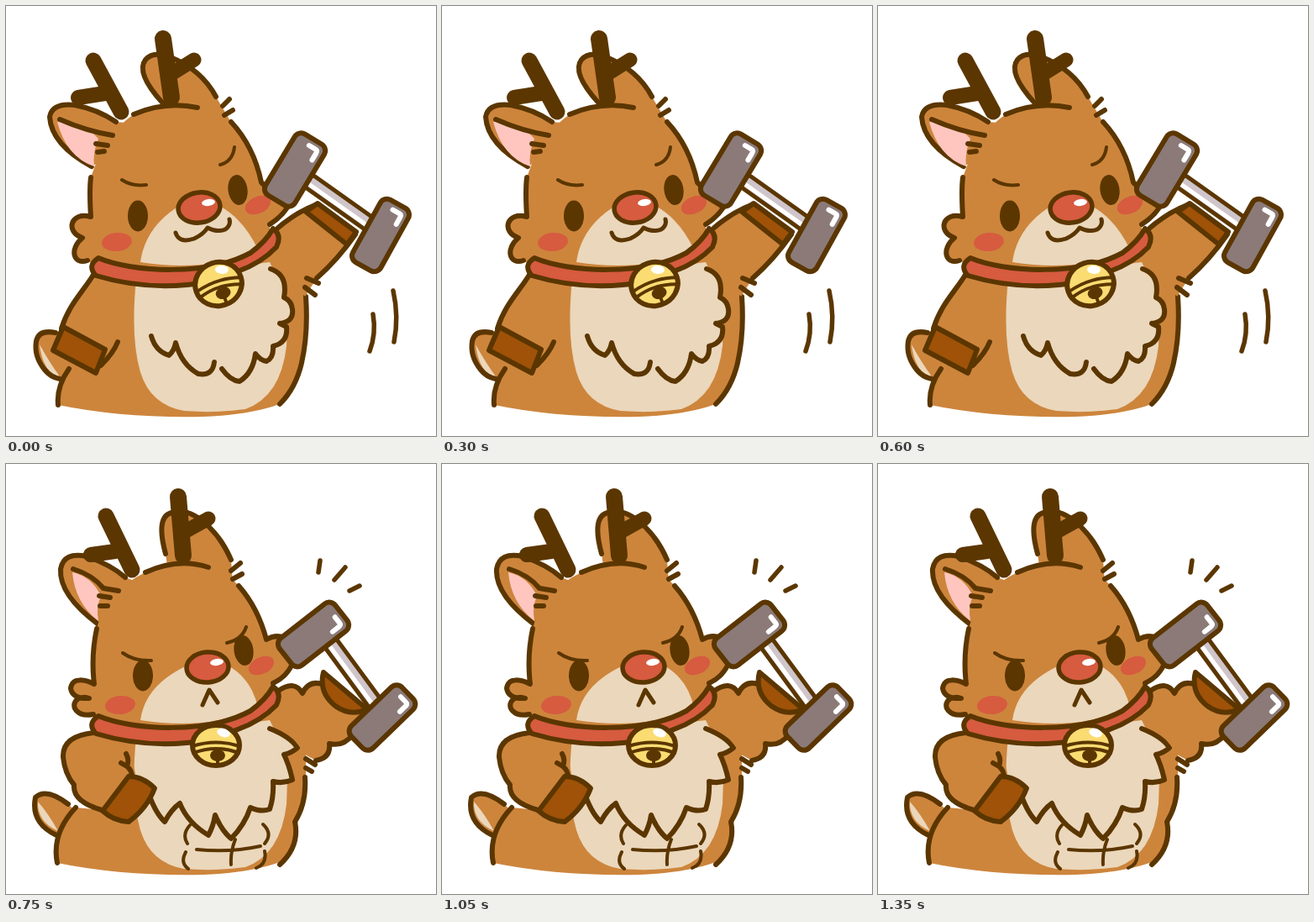
Write an HTML page that moves like this. It is 512x512 px and loops after 1.5 s.

```html
<!DOCTYPE html>
<html lang="en">
<head>
<meta charset="utf-8">
<title>Reindeer workout</title>
<style>
  html, body { margin: 0; width: 100%; height: 100%; overflow: hidden; background: #fff; }
  svg { display: block; width: 100vw; height: 100vh; }
</style>
</head>
<body>
<svg id="stage" viewBox="0 0 512 512" stroke-linecap="round" stroke-linejoin="round"></svg>
<script>
const INK = '#5b3600', FUR = '#cd853c', CREAM = '#ebd7bb', CUFF = '#9f5208', RED = '#d65b3f',
  PINK = '#fec6bf', GOLD = '#fbdc72', STEEL = '#8b7a78', BAR = '#cfc5ca';

const line = (d, width = 6, color = INK) =>
  `<path d="${d}" fill="none" stroke="${color}" stroke-width="${width}"/>`;
const fill = (d, color) => `<path d="${d}" fill="${color}"/>`;
const shape = (d, color) => `<path d="${d}" fill="${color}" stroke="${INK}" stroke-width="6"/>`;
const oval = (x, y, rx, ry, turn, color, extra = '') =>
  `<ellipse cx="${x}" cy="${y}" rx="${rx}" ry="${ry}" transform="rotate(${turn} ${x} ${y})" fill="${color}" ${extra}/>`;

const softRight = '357,346 Q360,390 352,425 Q345,455 326,474';
const softChest = 'M173,393 Q178,411 194,416 Q200,411 202,401 Q209,427 229,438 Q246,441 248,424 ' +
  'M257,432 Q267,446 278,447 Q294,437 297,414 Q303,422 310,423 Q319,419 318,405 Q336,401 334,382 L326,378 ' +
  'M326,378 Q343,376 341,361 Q340,351 331,347 Q336,320 315,313';
const toughRight = '356,373 Q358,404 344,426 Q350,455 326,477';
const toughChest = 'M168,387 Q177,415 189,426 Q197,411 207,404 Q216,427 241,442 Q247,431 249,418 ' +
  'Q257,437 268,446 Q284,430 291,409 Q304,415 314,411 Q319,396 318,378 Q330,381 341,376 ' +
  'Q337,358 331,346 Q340,344 347,338 Q339,325 314,315';
const toughAbs = 'M219,430 Q209,441 216,452 M214,462 Q207,475 217,482 M306,429 Q318,440 308,452 ' +
  'M308,461 Q311,476 298,481 M227,459 Q266,463 303,455 M273,447 Q267,462 268,477';
const toughFace = {
  eyes: [163, 252, 283, 222], nose: [240, 242, -4], blush: [136, 287, 304, 240],
  brows: 'M139,225 Q153,235 173,234 M263,213 Q281,209 286,194',
  mouth: 'M234,287 L242,269 L252,284'
};
const toughHead = {
  left: '104,298 C86,302 75,289 85,280 Q92,276 99,279 Q79,280 77,267 C79,253 95,257 105,262 Q101,229 108,196',
  top: '166,129 Q205,111 241,123',
  right: '277,145 Q300,171 310,209 Q326,200 338,212 L340,240 Q333,254 318,261',
  pink: 'M79,129 Q102,134 113,157 Q107,171 110,187 Q82,165 79,129Z',
  earFold: 'M80,125 Q103,132 116,148 L134,151',
  ticks: 'M111,157 L124,159 M112,169 L121,169 M268,127 L279,118 M270,137 L281,131',
  antlers: ['M119,62 L150,126', 'M101,108 L130,104', 'M205,39 L211,109', 'M214,80 L241,65']
};
const softMouth = 'M206,274 Q210,288 228,281 Q240,276 246,267 Q256,273 264,269 Q271,263 267,256';
const sparks = 'M374,115 L372,129 M404,123 L391,138 M421,145 L409,151';

const poses = {
  A: {
    tail: '59,389 Q39,385 36,399 Q33,417 46,433 Q53,442 64,444', tailCream: 'M40,403 Q52,425 64,441 Q44,437 40,403Z',
    flank: '104,320 C92,340 75,355 66,384', hip: '75,432 Q60,453 62,475', side: softRight, chest: softChest,
    innerArm: 'M133,400 Q128,413 113,428', leftCuff: 'M68,382 L118,409 L107,437 L56,410Z',
    arm: { top: '324,264 Q345,246 368,237', tip: '416,270', bottom: '416,272 Q395,302 370,324' },
    armTicks: 'M358,324 L372,330 M356,335 L368,344', rightCuff: 'M371,235 L417,269 L406,284 L357,245Z',
    head: {
      left: '97,303 C80,309 75,289 91,276 C70,269 77,244 101,251 Q99,220 101,204',
      top: '152,129 Q190,113 228,121', right: '268,138 Q295,167 304,210 L335,240 Q328,251 314,260',
      pink: 'M61,138 Q90,136 110,158 Q103,174 105,191 Q72,180 61,138Z',
      earFold: 'M64,135 Q96,149 127,154',
      ticks: 'M107,164 L121,166 M109,174 L117,173 M258,119 L266,111 M260,130 L270,124',
      antlers: ['M104,65 L137,126', 'M86,109 L118,104', 'M187,39 L197,109', 'M200,79 L224,64']
    },
    leftEar: '102,191 Q54,165 52,132 Q55,115 82,118 Q109,123 131,138',
    rightEar: '187,116 Q154,80 166,64 Q176,53 196,61 Q233,76 250,108',
    face: {
      eyes: [157, 250, 276, 219], nose: [230, 240, -8], blush: [132, 281, 300, 237],
      brows: 'M138,207 Q150,215 167,213 M255,189 Q270,185 272,168',
      mouth: 'M202,270 Q206,283 224,277 Q235,272 240,264 Q252,270 261,266 Q268,261 266,254'
    },
    bell: [253, 331, -18, 26],
    weights: [[344, 195, 41, 85, 31], [446, 273, 38, 85, 29]], bar: [363, 210, 432, 259],
    accents: 'M437,367 Q441,390 433,411 M461,339 Q468,370 462,400'
  },
  B: {
    tail: '66,411 Q45,393 33,402 Q24,426 58,442', tailCream: 'M37,406 Q49,421 63,439 Q34,431 37,406Z',
    flank: '104,318 Q76,350 70,396', hip: '72,434 Q59,453 62,475', side: softRight, chest: softChest,
    innerArm: 'M139,398 L134,425', leftCuff: 'M72,395 Q103,409 137,407 L130,440 Q95,440 65,421Z',
    arm: { top: '324,274 Q360,261 398,258', tip: '415,312', bottom: '415,314 Q386,324 360,340' },
    armTicks: 'M358,350 L370,354 M358,361 L365,367', rightCuff: 'M384,262 L399,258 L420,311 L406,317Z',
    head: {
      left: '104,302 C86,307 73,291 84,284 Q90,280 97,283 Q77,283 76,269 C78,256 96,259 106,264 Q102,226 105,199',
      top: '166,128 Q200,113 237,124',
      right: '274,146 Q297,170 306,208 Q321,200 328,212 Q329,222 324,229 Q341,228 342,240 Q338,256 318,262',
      pink: 'M76,124 Q100,130 112,155 Q104,172 107,190 Q80,165 76,124Z',
      earFold: 'M78,122 Q99,132 113,149 Q125,153 134,150',
      ticks: 'M111,158 L124,158 M112,170 L121,171 M262,129 L272,121 M264,138 L274,132',
      antlers: ['M115,64 L148,126', 'M95,110 L128,105', 'M199,40 L205,111', 'M211,79 L237,67']
    },
    leftEar: '107,192 Q62,144 67,116 Q74,100 95,110 Q120,122 142,138',
    rightEar: '187,115 Q164,82 176,66 Q186,56 204,63 Q242,79 258,115',
    face: {
      eyes: [161, 255, 279, 223], nose: [235, 243, -6], blush: [136, 287, 304, 240],
      brows: 'M140,215 Q152,224 170,220 M260,199 Q275,196 276,178', mouth: softMouth
    },
    bell: [250, 335, 0, 24],
    weights: [[387, 213, 41, 84, 67], [448, 327, 38, 83, 65]], bar: [399, 234, 437, 314],
    accents: 'M437,395 Q434,412 426,426 M465,377 Q464,400 458,414'
  },
  C: {
    tail: '73,415 C69,383 46,378 37,397 Q35,427 58,444', tailCream: 'M42,398 Q54,416 57,440 Q39,425 42,398Z',
    flank: '104,320 Q66,324 66,350 Q68,370 79,383 Q78,407 110,416', hip: '83,409 Q54,440 61,475',
    side: toughRight, chest: toughChest, abs: toughAbs,
    innerArm: 'M143,346 Q149,357 144,365 Q150,364 154,372', leftCuff: 'M150,373 Q163,374 177,388 Q166,415 138,435 Q122,430 110,418Z',
    arm: { top: '323,275 Q345,258 358,277 Q367,260 386,264', tip: '440,295', bottom: '432,320 Q420,336 400,333 Q392,358 370,362' },
    armTicks: 'M357,351 L366,353 M357,361 L364,363', rightCuff: 'M386,251 L437,296 Q420,301 401,292 Q379,277 386,251Z',
    head: toughHead, face: toughFace,
    leftEar: '110,191 Q65,158 66,127 Q70,106 97,111 Q125,120 142,135',
    rightEar: '190,105 Q172,63 194,57 Q216,51 241,75 Q257,91 268,113',
    bell: [250, 335, 0, 24],
    weights: [[376, 211, 41, 82, 39], [463, 304, 40, 82, 38]], bar: [388, 232, 444, 296],
    accents: sparks
  },
  D: {
    tail: '74,405 Q48,385 35,397 Q29,427 60,442', tailCream: 'M38,402 Q51,417 62,437 Q37,426 38,402Z',
    flank: '104,320 Q67,324 68,349 Q70,369 81,382 Q79,402 114,412', hip: '83,409 Q54,440 61,475',
    side: toughRight, chest: toughChest, abs: toughAbs,
    innerArm: 'M143,345 Q147,352 144,360 L137,356 M144,360 Q150,365 150,372', leftCuff: 'M146,372 Q163,372 177,386 Q168,410 146,426 Q128,425 115,413Z',
    arm: { top: '323,271 Q343,256 353,273 Q361,256 379,263', tip: '432,290', bottom: '413,322 Q402,337 385,333 Q387,350 369,353' },
    armTicks: 'M357,351 L368,358 M357,362 L364,366', rightCuff: 'M378,248 L430,292 Q410,301 392,288 Q372,272 378,248Z',
    head: toughHead, face: toughFace,
    leftEar: '110,191 Q63,156 65,125 Q69,104 96,110 Q125,120 142,135',
    rightEar: '190,107 Q178,63 197,58 Q218,51 242,75 Q258,91 268,114',
    bell: [250, 335, 0, 24],
    weights: [[366, 203, 41, 84, 52], [448, 302, 37, 84, 46]], bar: [387, 214, 440, 286],
    accents: sparks
  }
};

function drawTorso(p) {
  const base = 'Q140,491 235,489 Q290,487 326,474';
  const bodyFill = `M${p.flank} L${p.hip} ${base} L345,440 L357,375 L357,346 L322,285Z`;
  const cream = 'M155,325 Q148,395 160,436 Q172,475 212,482 Q250,485 285,480 Q327,465 334,405 ' +
    'L335,376 L326,330 L314,305Z';
  const fluff = p.chest.split(' M').pop().replace(/^M?/, 'M');
  return fill(`M${p.tail} L95,425Z`, FUR) + fill(p.tailCream, CREAM) + line(`M${p.tail}`) +
    fill(bodyFill, FUR) + fill(`M${p.side} L300,440 L315,330Z`, FUR) +
    fill(cream, CREAM) + fill(fluff + 'L270,330Z', CREAM) + line(p.chest) +
    (p.abs ? line(p.abs, 4) + fill('M100,325 L148,335 L155,375 L125,405 L82,390Z', FUR) : '') +
    line(`M${p.flank} M${p.hip} M${p.side}`) + line(p.innerArm) + shape(p.leftCuff, CUFF);
}

function drawArm(p) {
  const { top, tip, bottom } = p.arm;
  return fill(`M${top} L${tip} L${bottom} L356,346 Q340,320 312,302Z`, FUR) +
    line(`M${top} M${bottom}`) + line(p.armTicks) + shape(p.rightCuff, CUFF);
}

function drawHead(p) {
  const h = p.head, f = p.face, [nx, ny, tilt] = f.nose, [lx, ly, rx, ry] = f.eyes, b = f.blush;
  const [leftTrunk, leftBranch, rightTrunk, rightBranch] = h.antlers;
  const muzzle = `M160,305 Q166,262 ${nx - 22},${ny - 3} L${nx + 22},${ny - 3} ` +
    `Q${nx + 52},${ny + 12} 300,290 Q240,318 160,305Z`;
  return fill(`M${p.rightEar} L270,142 L195,142Z`, FUR) + line(`M${p.rightEar}`) +
    fill(`M${p.leftEar} L155,140 L140,170Z`, FUR) + line(`M${p.leftEar}`) +
    fill(`M${h.left} Q118,152 ${h.top} Q260,126 ${h.right} L314,288 L210,318 L110,312Z`, FUR) +
    fill(h.pink, PINK) + line(h.earFold) + line(h.ticks) +
    line(leftTrunk, 19) + line(leftBranch, 18) + line(rightTrunk, 20) + line(rightBranch, 17) +
    line(`M${h.left} M${h.top} M${h.right}`) +
    fill(muzzle, CREAM) +
    oval(b[0], b[1], 18, 11, -6, RED) + oval(b[2], b[3], 16, 10, -25, RED) +
    oval(lx, ly, 12, 18.5, 0, INK) + oval(rx, ry, 11.5, 18, -8, INK) +
    line(f.brows, 4) + line(f.mouth, 5) +
    oval(nx, ny, 25, 18, tilt, RED, `stroke="${INK}" stroke-width="5.5"`) +
    oval(nx + 11, ny - 6, 8, 4, -8, '#fff');
}

function drawCollar([x, y, turn, ry]) {
  const band = 'M110,300 C150,317 240,322 291,294 Q309,281 318,265 Q329,273 322,287 ' +
    'Q304,306 276,316 Q245,330 215,332 Q160,337 107,321 Q96,309 110,300Z';
  return shape(band, RED) + `<g transform="translate(${x} ${y}) rotate(${turn})">` +
    oval(0, 0, 28, ry, 0, GOLD, `stroke="${INK}" stroke-width="6"`) +
    line('M-28,1 Q0,-8 28,1 M-27,9 Q0,-1 27,9', 4) +
    oval(2, 12, 9, 7, 0, INK) + line(`M2,12 V${ry - 2}`, 4) +
    oval(9, -15, 8, 5, 20, '#fff') + '</g>';
}

function drawWeight([x, y, w, h, turn]) {
  const top = 9 - h / 2, side = w / 2 - 9;
  return `<g transform="translate(${x} ${y}) rotate(${turn})">` +
    `<rect x="${-w / 2}" y="${-h / 2}" width="${w}" height="${h}" rx="9" fill="${STEEL}" stroke="${INK}" stroke-width="6"/>` +
    line(`M${side - 12},${top} H${side - 3} Q${side},${top} ${side},${top + 4} V${top + 13}`, 6, '#fff') + '</g>';
}

function drawDumbbell({ weights, bar: [x1, y1, x2, y2] }) {
  const length = Math.hypot(x2 - x1, y2 - y1);
  const turn = Math.atan2(y2 - y1, x2 - x1) * 180 / Math.PI;
  const rod = `M0,0 H${length}`;
  return `<g transform="translate(${x1} ${y1}) rotate(${turn})">` + line(rod, 22) + line(rod, 12, BAR) +
    line(`M0,3 H${length}`, 5, '#fff') + '</g>' + weights.map(drawWeight).join('');
}

const drawPose = p => drawTorso(p) + drawArm(p) + drawHead(p) + drawCollar(p.bell) +
  drawDumbbell(p) + line(p.accents, 5.5);

const stage = document.getElementById('stage');
stage.innerHTML = Object.entries(poses).map(([name, p]) => `<g id="${name}">${drawPose(p)}</g>`).join('');
const groups = [...stage.children];

const STEP = 150, order = 'ABABADCDCD';
function render(time) {
  const current = order[Math.floor(time / STEP) % order.length];
  for (const g of groups) g.style.display = g.id === current ? '' : 'none';
}

const start = performance.now();
function tick() {
  render(performance.now() - start);
  requestAnimationFrame(tick);
}
tick();
</script>
</body>
</html>
```
